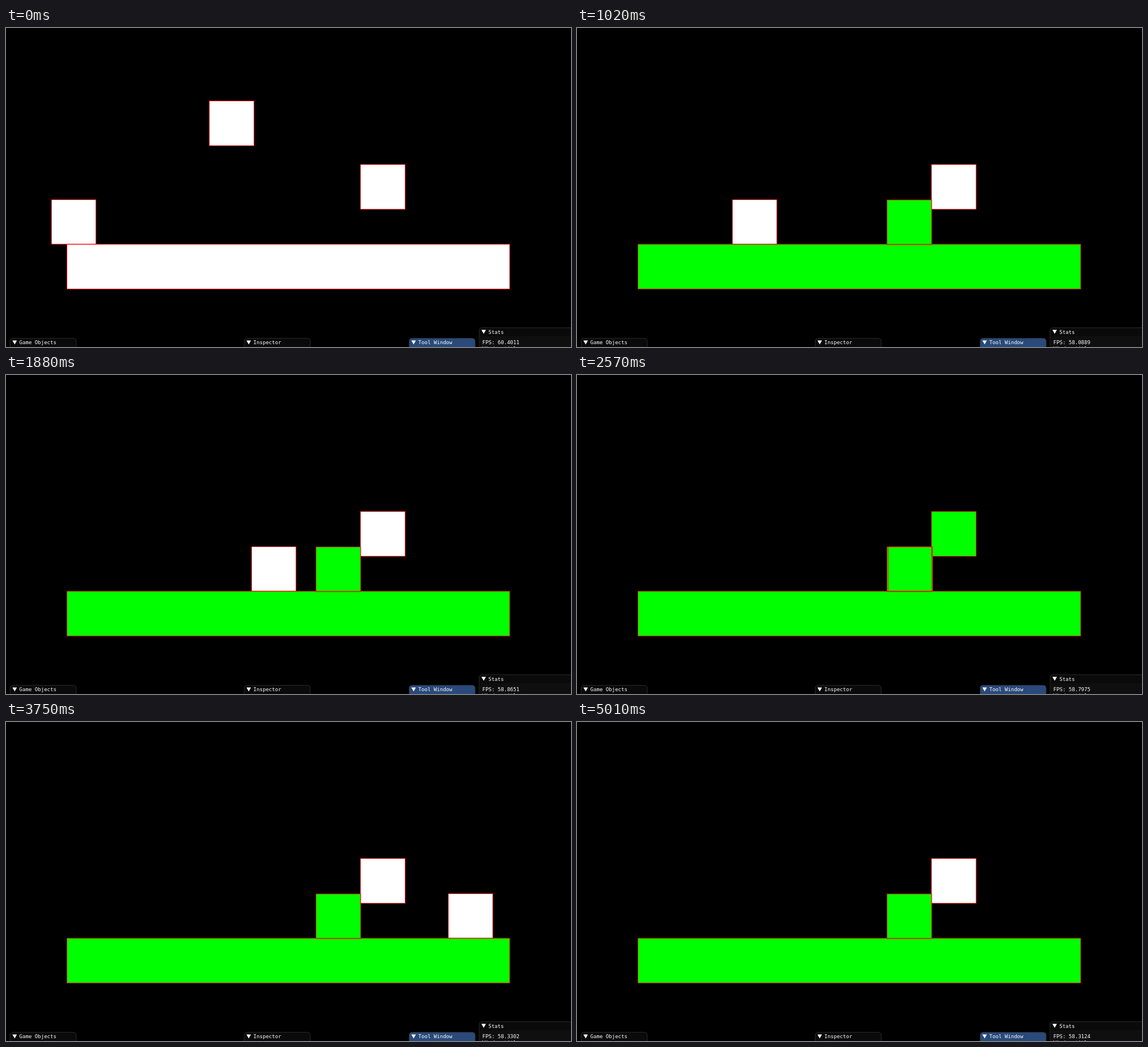
These frames come from a looping animation (997 px wide and 562 px high, 5.1 s). An HTML page:

```html
<!DOCTYPE html>
<html lang="en">
<head>
<meta charset="utf-8">
<title>Box collisions</title>
<style>
  html, body { margin: 0; width: 100%; height: 100%; overflow: hidden; background: #000; }
  svg { display: block; width: 997px; height: 562px; }
  text { font: 9.06px "DejaVu Sans Mono", monospace; fill: #fff; white-space: pre; }
  .outline { fill: none; stroke: #f00; stroke-opacity: .9; }
  .window { stroke: #36363b; stroke-width: .8; }
</style>
</head>
<body>
<svg id="stage" viewBox="0 0 997 562"></svg>
<script>
const LOOP = 5100, STEP = 78.1, LAST_STEP = 64;
const stage = document.getElementById('stage');

function add(tag, attrs, content = '') {
  const node = document.createElementNS('http://www.w3.org/2000/svg', tag);
  for (const key in attrs) node.setAttribute(key, attrs[key]);
  node.textContent = content;
  return stage.appendChild(node);
}

// Piecewise linear value of [[x, y], ...] at v.
function sample(points, v) {
  let k = 1;
  while (k < points.length - 1 && points[k][0] < v) k++;
  const [x0, y0] = points[k - 1], [x1, y1] = points[k];
  return y0 + (y1 - y0) * (v - x0) / (x1 - x0);
}

// Key points over step numbers.
const moverPath = [[0, 80.2], [13, 274.2], [54, 867.3], [64, 1010]];
const fpsCurve = [[0, 60.4011], [8, 60.5327], [13, 58.0889], [24, 58.8651],
  [42, 58.713], [54, 57.9475], [64, 58.3124]];

const boxes = {
  bar: { x: 107.5, y: 381, w: 781.4, h: 78.9 },
  faller: { x: 358.8, y: 128.4, w: 78.9, h: 78.9 },
  ledge: { x: 625.4, y: 240.4, w: 78.9, h: 78.9 },
  mover: { x: 80.2, y: 302.4, w: 78.5, h: 78.5 }
};
const all = Object.values(boxes);
for (const box of all) box.fill = add('rect', {});
for (const box of all) box.outline = add('rect', { class: 'outline' });

const overlap = (a, b) =>
  a.x < b.x + b.w && b.x < a.x + a.w && a.y < b.y + b.h && b.y < a.y + a.h;

// Thrown sideways, stopped by the ledge, then dropped onto the bar.
const HIT = 490, GRAVITY = 0.00096, FLOOR = 302.9;
function fall(t) {
  const drop = s => GRAVITY * s * s / 2;
  const x = 358.8 + 188.2 * Math.min(t / HIT, 1);
  const y = 128.4 + (t < HIT ? drop(t) : drop(HIT) + drop(t - HIT));
  return { x, y: Math.min(y, FLOOR), landed: y >= FLOOR };
}

function panel(x, y, w, title, color) {
  add('path', {
    class: 'window', fill: color,
    d: `M${x} 563V${y + 5.5}q0-5.5 5.5-5.5h${w - 11}q5.5 0 5.5 5.5V563`
  });
  add('path', { fill: '#fff', d: `M${x + 4} ${y + 3.8}h8l-4 6.9z` });
  add('text', { x: x + 16.3, y: y + 10.7 }, title);
}
panel(7.3, 546.7, 116.6, 'Game Objects', '#0a0a0a');
panel(420.3, 546.7, 116.6, 'Inspector', '#0a0a0a');
panel(711.3, 546.7, 116.6, 'Tool Window', '#294a7a');
panel(834.9, 528, 175, 'Stats', '#0a0a0a');
add('rect', { x: 835.5, y: 543, width: 162, height: 19, fill: '#0f0f0f' });
const fps = add('text', { x: 840.6, y: 557.3 });
add('text', { x: 840.6, y: 567.6 }, 'Window title');

function draw(step) {
  const { bar, faller, ledge, mover } = boxes;
  const { x, y, landed } = fall(step * STEP);
  Object.assign(faller, { x, y });
  mover.x = sample(moverPath, step);

  ledge.hit = overlap(mover, ledge);
  mover.hit = ledge.hit || overlap(mover, faller);
  bar.hit = faller.hit = landed;

  for (const box of all) {
    for (const rect of [box.fill, box.outline]) {
      rect.setAttribute('x', box.x);
      rect.setAttribute('y', box.y);
      rect.setAttribute('width', box.w);
      rect.setAttribute('height', box.h);
    }
    box.fill.setAttribute('fill', box.hit ? '#0f0' : '#fff');
  }
  fps.textContent = 'FPS: ' + Number(sample(fpsCurve, step).toPrecision(6));
}

const start = performance.now();
function tick() {
  const t = (performance.now() - start) % LOOP;
  draw(Math.min(Math.floor(t / STEP), LAST_STEP));
  requestAnimationFrame(tick);
}
tick();
</script>
</body>
</html>
```
